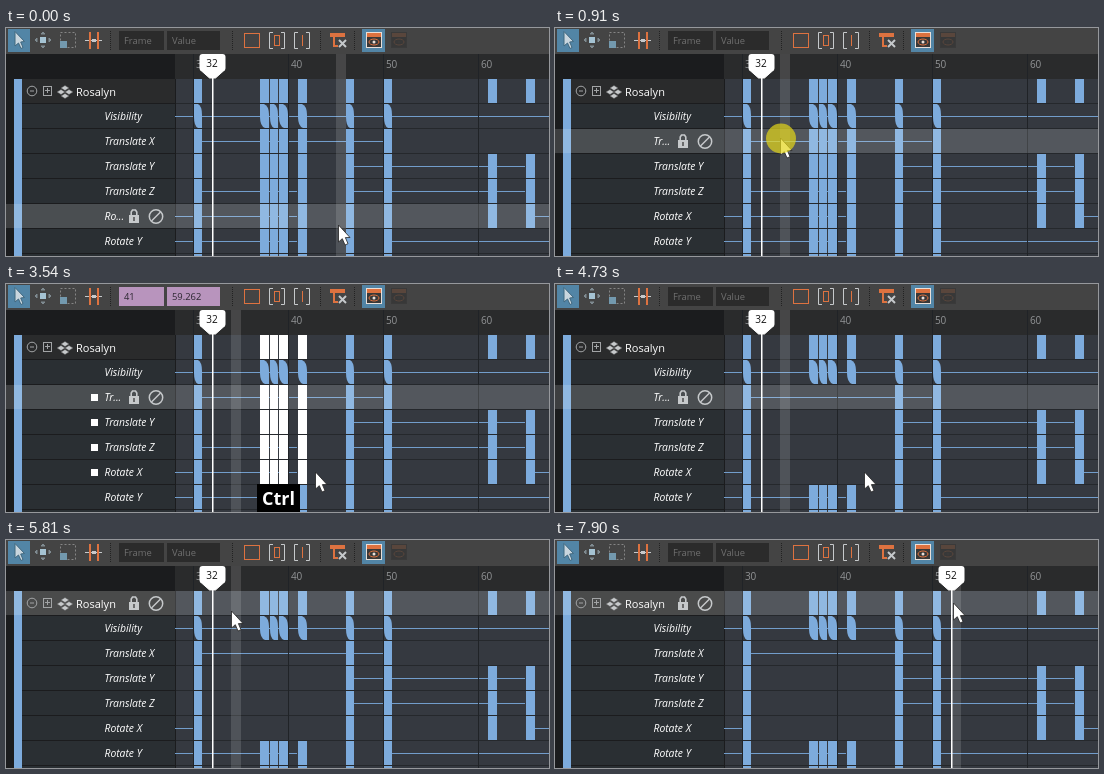
An HTML page with a canvas for the animation above (8000 ms loop, 543 px wide and 228 px high).

```html
<!DOCTYPE html>
<html lang="en">
<head>
<meta charset="utf-8">
<title>Dope sheet</title>
<style>
html, body { margin: 0; width: 100%; height: 100%; overflow: hidden; background: #1b1c1e; }
canvas { display: block; }
</style>
</head>
<body>
<canvas id="stage" width="543" height="228"></canvas>
<script>
const W = 543, H = 228, LOOP = 8000, TICK = 68.8;
const g = document.getElementById('stage').getContext('2d');
const BLUE = '#7dabdc', ORANGE = '#dd7240', GREY = '#c6c9cb', DIM = '#a2a4a6', BUTTON = '#5285a6';
const SANS = '"Open Sans", "Noto Sans", sans-serif';

const ROWS = ['Rosalyn', 'Visibility', 'Translate X', 'Translate Y', 'Translate Z',
  'Rotate X', 'Rotate Y', 'Rotate Z'];
const KEYS = [30, 37, 38, 39, 41, 46, 50], LATE = [61, 65];
// Spans of constant value per row; "cut" spans vanish with the deleted keys
const SPANS = [[], [[20, 80]], [[30, 50]], [[46, 65]], [[46, 65]],
  [[20, 30], [65, 80]], [[20, 41], [50, 80]], []];
const CUT_SPANS = { 4: [30, 41], 5: [30, 41] };

// Pointer path: tick, x, y, eased
const PATH = [[0, 333, 197, 1], [11, 226, 110], [13, 226, 110, 1], [22, 310, 188],
  [75, 310, 188], [78, 297, 170], [84, 226, 71], [87, 216, 49], [90, 208, 39],
  [93, 208, 39], [95, 216, 42], [104, 379, 59], [106, 399, 63], [200, 399, 63]];

const frameX = f => 187.4 + (f - 30) * 9.5;
const frameAt = x => Math.floor(30 + (x - 187) / 9.5);
const rowY = r => 51 + r * 25;
const isSelectable = r => r >= 2 && r <= 5;

function rect(x, y, w, h, color) {
  g.fillStyle = color;
  g.fillRect(x, y, w, h);
}
function box(x, y, w, h, color) {
  g.strokeStyle = color;
  g.lineWidth = 1;
  g.strokeRect(x + .5, y + .5, w - 1, h - 1);
}
function text(s, x, y, font, color, align = 'left') {
  g.font = font + ' ' + SANS;
  g.fillStyle = color;
  g.textAlign = align;
  g.fillText(s, x, y);
}
function line(points, color, width = 1, fill) {
  g.beginPath();
  for (let i = 0; i < points.length; i += 2) g.lineTo(points[i], points[i + 1]);
  if (fill) {
    g.closePath();
    g.fillStyle = fill;
    g.fill();
  }
  g.strokeStyle = color;
  g.lineWidth = width;
  g.stroke();
}
function circle(x, y, r, color, width) {
  g.beginPath();
  g.arc(x, y, r, 0, 7);
  g.lineWidth = width || 1;
  g[width ? 'strokeStyle' : 'fillStyle'] = color;
  width ? g.stroke() : g.fill();
}
function at(x, y, draw) {
  g.save();
  g.translate(x, y);
  draw();
  g.restore();
}

function pointerAt(t) {
  const k = Math.floor(t / TICK);
  const i = PATH.findIndex((p, n) => k < PATH[n + 1][0]);
  const [k0, x0, y0, eased] = PATH[i], [k1, x1, y1] = PATH[i + 1];
  let u = (k - k0) / (k1 - k0);
  if (eased) u = u * u * (3 - 2 * u);
  return { x: x0 + (x1 - x0) * u, y: y0 + (y1 - y0) * u };
}

function hoverAt(t, p) {
  if (t >= 910 && t < 5260) return { row: 2, col: 34 };
  if (t >= 6020 && t < 7900) return { row: -1, col: 32 };
  return { row: Math.floor((p.y - 51) / 25), col: frameAt(p.x) };
}

function toolbar(selected) {
  rect(0, 0, W, 26, '#444');
  rect(2, 1, 22, 23, BUTTON);
  line([9, 3.5, 9, 18, 12.5, 15, 15, 20.5, 17, 19.5, 14.7, 14, 18.5, 13.5], '#41687f', 1, '#c9d6de');

  rect(34, 9, 6, 6, '#a5c3d3');
  for (let i = 0; i < 4; i++) at(37, 12, () => {
    g.rotate(i * Math.PI / 2);
    line([-2, -6, 0, -8, 2, -6], '#7f8a90', 1, '#7f8a90');
  });

  g.setLineDash([2, 2]);
  box(54, 4, 16, 16, '#858585');
  g.setLineDash([]);
  rect(54, 13, 7, 7, '#7399ae');

  rect(79, 12, 17, 1, GREY);
  for (const x of [83, 91]) rect(x, 4, 2, 17, ORANGE);
  rect(86, 11, 4, 3, GREY);
  for (const x of [104, 226, 314, 348])
    for (let y = 3; y < 23; y += 2) rect(x, y, 1, 1, '#222');

  const field = (x, w, hint, value) => {
    rect(x, 3, w, 19, selected ? '#b894bd' : '#2b2b2b');
    text(selected ? value : hint, x + 5, 16, '9.4px', selected ? '#2b2630' : '#707070');
  };
  field(113, 45, 'Frame', '41');
  field(161, 53, 'Value', '59.262');

  box(238, 5, 16, 15, ORANGE);
  for (const x of [271, 296]) {
    line([x - 4, 4.5, x - 7.5, 4.5, x - 7.5, 20.5, x - 4, 20.5], GREY);
    line([x + 4, 4.5, x + 7.5, 4.5, x + 7.5, 20.5, x + 4, 20.5], GREY);
  }
  box(268, 7, 6, 11, ORANGE);
  rect(296, 7, 1, 11, ORANGE);

  rect(324, 5, 15, 4, ORANGE);
  rect(327, 9, 2, 10, ORANGE);
  rect(327, 17, 5, 2, ORANGE);
  line([333, 12, 340, 19], GREY, 2);
  line([340, 12, 333, 19], GREY, 2);

  rect(356, 1, 23, 23, BUTTON);
  for (const [x, frame, accent] of [[360, '#eadfd8', ORANGE], [385, '#3a3a3a', '#59463c']]) {
    rect(x, 4, 16, 16, '#383838');
    rect(x, 4, 16, 5, accent);
    box(x, 4, 16, 16, frame);
    g.beginPath();
    g.ellipse(x + 8, 14, 5, 3, 0, 0, 7);
    g.strokeStyle = accent;
    g.stroke();
    circle(x + 8, 14, 1.5, frame);
  }
}

function key(r, f, color) {
  const x = Math.ceil(frameX(f)), right = Math.floor(frameX(f + 1)), y = rowY(r);
  if (r !== 1) return rect(x, y, right - x, 24, color);
  g.fillStyle = color;
  g.beginPath();
  g.moveTo(x, y);
  g.lineTo(x + 4, y);
  g.quadraticCurveTo(right, y + 2, right, y + 11);
  g.lineTo(right, y + 24);
  g.lineTo(right - 4, y + 24);
  g.quadraticCurveTo(x, y + 22, x, y + 13);
  g.fill();
}

function sheet(selected, cut, hover) {
  rect(0, 26, W, H, '#1b1c1e');
  rect(169, 26, W, 25, '#2a2b2c');
  ROWS.forEach((name, r) => {
    const y = rowY(r);
    rect(16, y, 153, 24, r ? '#2a2f33' : '#2a2b2c');
    rect(170, y, W, 24, '#353940');
    rect(170, y + 24, W, 1, '#25282c');
    const spans = cut || !CUT_SPANS[r] ? SPANS[r] : [...SPANS[r], CUT_SPANS[r]];
    for (const [a, b] of spans) {
      const x = Math.max(169, Math.ceil(frameX(a)));
      rect(x, y + 12, Math.floor(frameX(b)) - x, 1, '#729dcb');
    }
  });
  for (let f = 30; f <= 60; f += 10) {
    rect(Math.floor(frameX(f)), 26, 1, H, '#202327');
    text(f, frameX(f) + 2.5, 40, '10px', '#929496');
  }
  rect(8, 51, 8, H, BLUE);

  ROWS.forEach((name, r) => {
    const keys = r === 0 || r > 2 && r < 6 ? [...KEYS, ...LATE] : KEYS;
    for (const f of keys) {
      const cuttable = f > 36 && f < 42;
      if (cuttable && cut && isSelectable(r)) continue;
      const lit = selected && cuttable && (r === 0 || isSelectable(r));
      key(r, f, lit ? '#fff' : BLUE);
    }
  });

  rect(Math.round(frameX(hover.col)), 26, 10, H, 'rgba(255,255,255,.13)');
  if (hover.row >= 0) rect(0, rowY(hover.row), W, 24, 'rgba(255,255,255,.15)');
}

function labels(selected, hover) {
  circle(26, 63, 4.8, DIM, 1);
  rect(24, 62.5, 4, 1, DIM);
  box(37, 58, 9, 10, DIM);
  rect(39, 62, 5, 1, DIM);
  rect(41, 60, 1, 5, DIM);
  for (const [x, y] of [[59, 60], [55, 64], [63, 64], [59, 68]])
    line([x - 4, y, x, y - 2.5, x + 4, y, x, y + 2.5], '#555', .5, GREY);

  ROWS.forEach((name, r) => {
    const y = rowY(r), hovered = r === hover.row;
    if (r === 0) text(name, 70, y + 17, '11px', '#fff');
    else text(hovered ? name.slice(0, 2) + '...' : name, 98.5, y + 16, 'italic 10.4px', '#fff');
    if (selected && isSelectable(r)) rect(85, y + 9, 7, 7, '#fff');
    if (!hovered) return;
    rect(123, y + 11, 10, 8, GREY);
    line([125.2, y + 11, 125.2, y + 8, 126.5, y + 6, 129.5, y + 6, 130.8, y + 8, 130.8, y + 11], GREY, 1.6);
    rect(127.3, y + 13, 1.4, 4, '#444');
    circle(150, y + 12.5, 6.7, GREY, 1.5);
    line([145.5, y + 17, 154.5, y + 8], GREY, 1.5);
  });
}

function playhead(f) {
  const x = Math.round(frameX(f)) + .5;
  rect(x - .5, 48, 1.5, H, '#fff');
  g.beginPath();
  g.roundRect(x - 13, 26, 26, 17, 3);
  g.fill();
  line([x - 12, 42, x + 12, 42, x + 3, 50, x - 3, 50], '#fff', 1, '#fff');
  text(f, x - .5, 39, '10px', '#111', 'center');
}

function arrow() {
  line([-.5, 0, -.5, 17, 3.3, 13.7, 6, 20, 9, 18.7, 6.4, 12.6, 11, 12.5], '#222', .8, '#fff');
}
function scrubber() {
  line([-11, 0, 0, -9, 11, 0, 0, 9], '#222', 1.3, '#fff');
  for (const y of [-3, 0, 3]) rect(-5, y - .6, 10, 1.2, '#222');
}

function keystroke(s, width) {
  rect(272.5 - width / 2, 200, width, 28, '#000');
  text(s, 272.5, 221, 'bold 18px', '#fff', 'center');
}

function draw(t) {
  const p = pointerAt(t), hover = hoverAt(t, p);
  const selected = t >= 2000 && t < 4530;
  const boxing = t >= 910 && t < 2000;
  const scrubbing = t >= 6430 && t < 7700;

  sheet(selected, t >= 4530, hover);
  labels(selected, hover);
  toolbar(selected);
  playhead(t < 6430 ? 32 : frameAt(p.x));

  if (boxing && p.x > 227) box(226, 110, Math.round(p.x) - 226, Math.round(p.y) - 110, 'rgba(255,255,255,.7)');
  at(p.x, p.y, t >= 6020 && t < 7900 ? scrubber : arrow);
  if (boxing || scrubbing) circle(p.x, p.y + .5, 15, 'rgba(228,214,24,.7)');

  if (t >= 3540 && t < 4200) keystroke('Ctrl', 43);
  if (t >= 4200 && t < 4730) keystroke('Ctrl + X', 81);
}

function tick() {
  draw(performance.now() % LOOP);
  requestAnimationFrame(tick);
}
tick();
</script>
</body>
</html>
```
